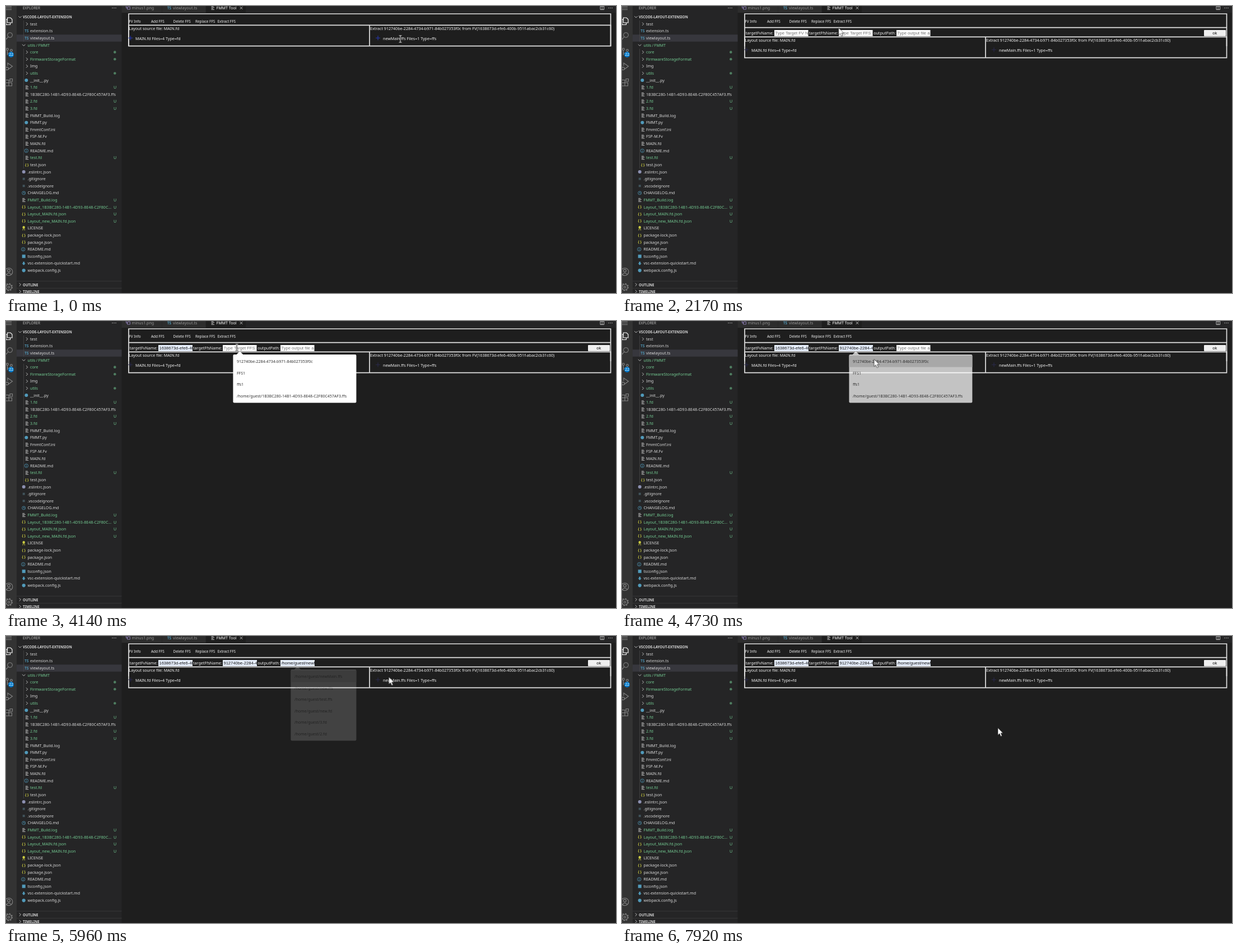
These frames come from a looping animation (1089x514 px, 7990 ms). An HTML page:

```html
<!DOCTYPE html>
<html lang="en">
<head>
<meta charset="utf-8">
<title>FMMT Tool</title>
<style>
html, body { margin: 0; width: 100%; height: 100%; overflow: hidden; background: #1e1e1e; }
svg { display: block; width: 1089px; height: 514px; }
text { font: 7.1px "Noto Sans", "Open Sans", sans-serif; fill: #d8d8d8; white-space: pre; }
.bold { font-size: 6.2px; font-weight: 700; }
.small { font-size: 6.4px; }
.web { fill: #f2f2f2; }
.field { font: 7.64px "Liberation Sans", Arial, sans-serif; fill: #111; }
.hint { fill: #757575; }
.option { font-size: 7px; fill: #333; }
.line { fill: none; stroke: #ccc; stroke-width: .9; }
.dim { stroke: #858585; stroke-width: 1.1; }
.plus { stroke: #2739b4; stroke-width: 1.1; fill: none; }
.frame { stroke: #e2e2e2; stroke-width: 1.7; fill: none; }
</style>
</head>
<body>
<svg id="stage" viewBox="0 0 1089 514" xmlns="http://www.w3.org/2000/svg"></svg>
<script>
const LOOP = 7990;
const GREEN = '#73c991', BLUE = '#519aba', YELLOW = '#cbcb41';

const rect = (x, y, w, h, fill, more = '') =>
  `<rect x="${x}" y="${y}" width="${w}" height="${h}" fill="${fill}" ${more}/>`;
const circle = (x, y, r, fill, more = '') => `<circle cx="${x}" cy="${y}" r="${r}" fill="${fill}" ${more}/>`;
const path = (d, cls = 'line', more = '') => `<path d="${d}" class="${cls}" ${more}/>`;
// y is the vertical middle of the line; baselines sit on whole pixels
const text = (x, y, str, cls = '', fill = '') =>
  `<text x="${x}" y="${Math.round(y + 2.5)}" class="${cls}" ${fill && `style="fill:${fill}"`}>${str}</text>`;
const group = (id, body) => `<g id="${id}">${body}</g>`;
const right = (x, y) => path(`M${x - 1.3} ${y - 2.7}l2.7 2.7l-2.7 2.7`);
const down = (x, y) => path(`M${x - 2.7} ${y - 1.3}l2.7 2.7l2.7 -2.7`);
const dots = (x, y) => [-3, 0, 3].map(d => circle(x + d, y, .7, '#ccc')).join('');
const lines = (x, y) => path(`M${x - 2.5} ${y - 2.8}h4M${x - 2.5} ${y - .9}h5.4M${x - 2.5} ${y + 1}h3.6M${x - 2.5} ${y + 2.9}h5.4`);

const icons = {
  '>': right,
  'v': down,
  ln: lines,
  ts: (x, y) => text(x - 4, y, 'TS', 'bold', BLUE),
  py: (x, y) => circle(x - 1, y, 3, BLUE),
  json: (x, y) => text(x - 3.3, y - .3, '{ }', 'bold', YELLOW),
  info: (x, y) => circle(x - 1, y, 3.2, 'none', `stroke="${BLUE}" stroke-width=".8"`) +
    path(`M${x - 1} ${y - 1.8}v.9M${x - 1} ${y - .3}v2.2`, 'line', `style="stroke:${BLUE}"`),
  clock: (x, y) => circle(x, y, 3, 'none', `stroke="${BLUE}" stroke-width=".8"`) +
    path(`M${x} ${y - 1.8}v2h1.5`, 'line', `style="stroke:${BLUE}"`),
  lint: (x, y) => circle(x, y, 3, '#8c90b0'),
  git: (x, y) => rect(x - 2, y - 2, 4, 4, '#41535b'),
  key: (x, y) => circle(x, y - 1.6, 2.2, YELLOW) + path(`M${x - .8} ${y}l-1 4M${x + .8} ${y}l1 4`, 'line', `style="stroke:${YELLOW}"`),
  conf: (x, y) => rect(x - 3, y - 3, 6, 6, BLUE),
  md: (x, y) => path(`M${x - 1.3} ${y - 3}h2.6v2.8h1.9L${x} ${y + 3.2}l-3.2 -3.4h1.9z`, '', `fill="${BLUE}"`),
  pack: (x, y) => circle(x, y, 3.1, BLUE)
};

// depth, icon, git mark (d: dot, g: green only, U: untracked, -: none), name
const tree = `2 > - test
2 ts - extension.ts
2 ts - viewlayout.ts
1 v g utils\u2009/\u2009FMMT
2 > d core
2 > d FirmwareStorageFormat
2 > - Img
2 > d utils
2 py - __init__.py
2 ln U 1.fd
2 ln - 1B3BC280-14B1-4D93-8E48-C2F80C457AF3.ffs
2 ln U 2.fd
2 ln U 3.fd
2 ln - FMMT_Build.log
2 py - FMMT.py
2 ln - FmmtConf.ini
2 ln - FSP-M.Fv
2 ln - MAIN.fd
2 info - README.md
2 ln U test.fd
2 json - test.json
1 lint - .eslintrc.json
1 git - .gitignore
1 git - .vscodeignore
1 clock - CHANGELOG.md
1 ln U FMMT_Build.log
1 json U Layout_1B3BC280-14B1-4D93-8E48-C2F80C...
1 json U Layout_MAIN.fd.json
1 json U Layout_new_MAIN.fd.json
1 key - LICENSE
1 json - package-lock.json
1 json - package.json
1 info - README.md
1 conf - tsconfig.json
1 md - vsc-extension-quickstart.md
1 pack - webpack.config.js`.split('\n').map(row => row.split(' '));

function sidebar() {
  let out = rect(19, 0, 187.5, 514, '#252526') + rect(19, 51.2, 187.5, 12.6, '#37373d') +
    text(30, 3.5, 'EXPLORER', 'small', '#bbb') + dots(193, 3.5) +
    down(25, 19.5) + text(30, 19.4, 'VSCODE-LAYOUT-EXTENSION', 'bold') +
    path('M31.5 26V64M31.5 76.5V291', '', 'stroke="#4b4b4b" stroke-width=".7"');
  tree.forEach(([depth, icon, mark, name], i) => {
    const y = 32.2 + i * 12.61, deep = depth === '2', color = mark === '-' ? '' : GREEN;
    out += icons[icon](deep ? 37.3 : 31.7, y) + text(deep ? 43 : 38.5, y, name, '', color);
    if (mark === 'd') out += circle(194.3, y, 2.3, GREEN, 'opacity=".55"');
    if (mark === 'U') out += text(192, y, 'U', '', GREEN);
  });
  [['OUTLINE', 499], ['TIMELINE', 511.4]].forEach(([name, y]) => {
    out += rect(19, y - 6.5, 187.5, .7, '#3f3f40') + right(25, y) + text(30, y, name, 'bold');
  });
  return out;
}

function activityBar() {
  const dim = d => path(d, 'line dim');
  return rect(0, 0, 19, 514, '#333') +
    dim('M0 .5H10M0 3.5H10M0 6.5H10') +
    path('M2.5 21H8l3 3V30H2.5zM2.5 24H0V33.5H7.5V30', 'line', 'style="stroke:#fff;stroke-width:1.1"') +
    circle(7, 52, 4.3, 'none', 'class="line dim"') + dim('M4 55L0 60') +
    circle(2.5, 77.5, 1.9, 'none', 'class="line dim"') + circle(9.5, 79.5, 1.9, 'none', 'class="line dim"') +
    dim('M2.5 79.5V88M9.5 81.5Q9 84.5 2.5 84.5') +
    circle(9, 87, 5, '#007acc') + text(5.6, 86.8, '22', 'small', '#fff') +
    dim('M3 107V102L11.5 108L4 113.5') + circle(2, 112, 2.5, 'none', 'class="line dim"') +
    dim('M0 132.5H5V143H0M0 137.5H10.5V143H5M7 130.5H11.5V135H7z') +
    circle(5, 476, 6.8, 'none', 'class="line dim"') + circle(5, 474, 2.4, 'none', 'class="line dim"') +
    dim('M.5 481Q5 475.5 9.5 481') +
    circle(5, 503.5, 5, 'none', 'class="line dim"') + circle(5, 503.5, 1.8, 'none', 'class="line dim"') +
    circle(5, 503.5, 6.2, 'none', 'stroke="#858585" stroke-width="1.6" stroke-dasharray="2.2 2.67"');
}

function tabs() {
  return rect(206.5, 0, 883, 12, '#252526') + rect(206.5, 0, 71.5, 12, '#2d2d2d') +
    rect(278.6, 0, 77.9, 12, '#2d2d2d') + rect(357, 0, 71, 12, '#1e1e1e') +
    path('M214.5 0V3.5H218M216.5 1.5H221.5V6H216.5z', 'line', 'style="stroke:#8f7fb8"') +
    text(224.5, 3.5, 'minus1.png', '', '#969696') +
    text(288, 3.5, 'TS', 'bold', BLUE) + text(298, 3.5, 'viewlayout.ts', '', '#969696') +
    lines(369, 3.5) + text(375.5, 3.5, 'FMMT Tool', '', '#fff') +
    path('M417.7 1.2l4.6 4.6m0 -4.6l-4.6 4.6') +
    path('M1061 .3H1067.5V6.5H1061zM1064.2 .3V6.5') + dots(1079, 3.5);
}

const OPTION_STEP = 20.5;
const fields = [
  { id: 'fv', x: 272, label: 'targetFvName:', labelX: 220.8, hint: 'Type Target FV Name', width: 156.5,
    options: ['1638673d-efe6-400b-951f-abac2cb31c60', 'FV0', '8ad52b63-f7ec-48c5-b2cd-45db4f14044b'] },
  { id: 'ffs', x: 387, label: 'targetFfsName:', labelX: 334, hint: 'Type Target FFS Name', width: 220,
    options: ['912740be-2284-4734-b971-84b027353f0c', 'FFS1', 'ffs1',
      '/home/guest/1B3BC280-14B1-4D93-8E48-C2F80C457AF3.ffs'] },
  { id: 'out', x: 490, label: 'outputPath:', labelX: 449.2, hint: 'Type output file and path', width: 117,
    options: ['/home/guest/newMain.ffs', '/home/guest/new.ffs', '/home/guest/test.ffs',
      '/home/guest/new.fd', '/home/guest/3.fd', '/home/guest/2.fd'] }
];

const input = ({ id, x, label, labelX, hint, options }) =>
  `<clipPath id="${id}Clip">${rect(x, 43, 60.5, 11)}</clipPath>` +
  text(labelX, 48.2, label, 'web') +
  `<g clip-path="url(#${id}Clip)">${rect(x, 43, 61, 11, '#fff')}${text(x + 1.4, 48.2, hint, 'field hint')}` +
  group(id + 'Value', rect(x, 43, 61, 11, '#e8f0fe') + text(x + 1.4, 48.2, options[0], 'field')) + '</g>';

const popup = ({ id, x, width, options }) => {
  const left = x + 18.4, tip = x + 30.4, height = options.length * OPTION_STEP + 4.5;
  return group(id + 'Popup',
    rect(left, 60, width, height, '#fff', 'rx="2"') +
    path(`M${tip - 6} 60.2L${tip} 54.3L${tip + 6} 60.2z`, '', 'fill="#fff"') +
    group(id + 'Hover', rect(left, 62, width, OPTION_STEP, '#dadada')) +
    options.map((o, i) => text(left + 6.5, 72.5 + i * OPTION_STEP, o, 'option')).join(''));
};

function webview() {
  const plus = x => path(`M${x - 4} 57.3h8M${x} 53.3v8`, 'plus');
  const buttons = [[219.5, 'FV Info'], [259, 'Add FFS'], [298.5, 'Delete FFS'], [338, 'Replace FFS'], [377.5, 'Extract FFS']];
  return path('M219 72V14H1079.5V72', 'frame') +
    buttons.map(([x, name]) => text(x, 27.3, name, 'small web')).join('') +
    group('form', path('M219 38.6H1079.5', 'frame') + fields.map(input).join('') +
      group('ok', rect(1039, 43, 39, 11, '#efefef', 'rx="1"')) + text(1054.3, 48, 'ok', 'field')) +
    group('panes', path('M219 34.3H1079.5V71.7H219zM649 34.3V71.7', 'frame') +
      text(219.5, 40.6, 'Layout source file: MAIN.fd', 'web') +
      text(650, 40.6, 'Extract 912740be-2284-4734-b971-84b027353f0c from FV(1638673d-efe6-400b-951f-abac2cb31c60)', 'web') +
      plus(222.3) + text(231, 58.7, 'MAIN.fd Files=4 Type=fd', 'web') +
      plus(664) + text(673, 58.7, 'newMain.ffs Files=1 Type=ffs', 'web')) +
    fields.map(popup).join('');
}

const BEAM = 'M-2.5 -6H2.5M0 -6V6M-2.5 6H2.5';
const cursor = group('cursor',
  group('arrow', path('M0 0V13L3 10.3L5.2 15.2L7.5 14.2L5.3 9.4H9.3z', '', 'fill="#fff" stroke="#111" stroke-width=".6"')) +
  group('beam', path(BEAM, '', 'fill="none" stroke="#111" stroke-width="2"') +
    path(BEAM, '', 'fill="none" stroke="#eee" stroke-width="1"')));

document.getElementById('stage').innerHTML = activityBar() + sidebar() + tabs() + webview() + cursor;

const sheet = document.head.appendChild(document.createElement('style'));
let count = 0;
// keys: [ms, css] pairs; the last value holds to the end of the loop
function track(selector, keys, timing = 'step-end') {
  const name = 'track' + count++;
  const stops = [...keys, [LOOP, keys[keys.length - 1][1]]];
  sheet.textContent += `@keyframes ${name}{${stops.map(([ms, css]) => `${ms / LOOP * 100}%{${css}}`).join('')}}
${selector}{animation:${name} ${LOOP}ms ${timing} infinite}\n`;
}
const show = (selector, keys) => track(selector, keys.map(([ms, on]) => [ms, `opacity:${on}`]));
const fade = (selector, inStart, inEnd, outStart, outEnd) => track(selector,
  [[0, 0], [inStart, 0], [inEnd, 1], [outStart, 1], [outEnd, 0]].map(([ms, o]) => [ms, `opacity:${o}`]), 'linear');

const FORM_OPENS = 1320;
show('#form', [[0, 0], [FORM_OPENS, 1]]);
track('#panes', [[0, 'transform:translateY(0)'], [FORM_OPENS, 'transform:translateY(21px)']]);
track('.plus', [[0, 'stroke:#2739b4'], [FORM_OPENS, 'stroke:#2b2b4c']]);

fade('#fvPopup', 2580, 2770, 3140, 3400);
fade('#ffsPopup', 3660, 3870, 4670, 4900);
fade('#outPopup', 5210, 5400, 5760, 6000);
[['fv', 2920], ['ffs', 4230], ['out', 5560]].forEach(([id, ms]) => {
  show(`#${id}Value`, [[0, 0], [ms, 1]]);
  show(`#${id}Hover`, [[0, 0], [ms, 1]]);
});
track('#ok rect', [[0, 'fill:#efefef'], [6690, 'fill:#e5e5e5'], [7100, 'fill:#f5f5f5'], [7240, 'fill:#e5e5e5'], [7640, 'fill:#efefef']]);

const moves = [[0, 704, 59], [120, 704, 59], [480, 520, 50], [820, 388, 33], [1020, 388, 33], [1200, 389, 25],
  [2020, 389, 25], [2170, 387, 39], [2440, 302, 47], [2840, 302, 47], [3040, 360, 68], [3120, 368, 68],
  [3200, 379, 59], [3480, 410, 48], [3600, 412, 47.5], [4140, 412, 47.5], [4400, 438, 72], [4690, 438, 72],
  [4940, 511.5, 50], [5470, 511.5, 50], [5640, 545, 71], [5800, 560, 73], [6250, 905, 74], [6290, 906, 74],
  [6630, 1027, 48], [6770, 1057, 47], [7580, 1057, 47], [7740, 880, 95], [7920, 671, 164.5]];
track('#cursor', moves.map(([ms, x, y]) => [ms, `transform:translate(${x}px,${y}px)`]), 'linear');

const beam = [[0, 1], [190, 0], [2380, 1], [2890, 0], [3430, 1], [4200, 0], [4880, 1], [5520, 0]];
show('#beam', beam);
show('#arrow', beam.map(([ms, on]) => [ms, 1 - on]));
</script>
</body>
</html>
```
